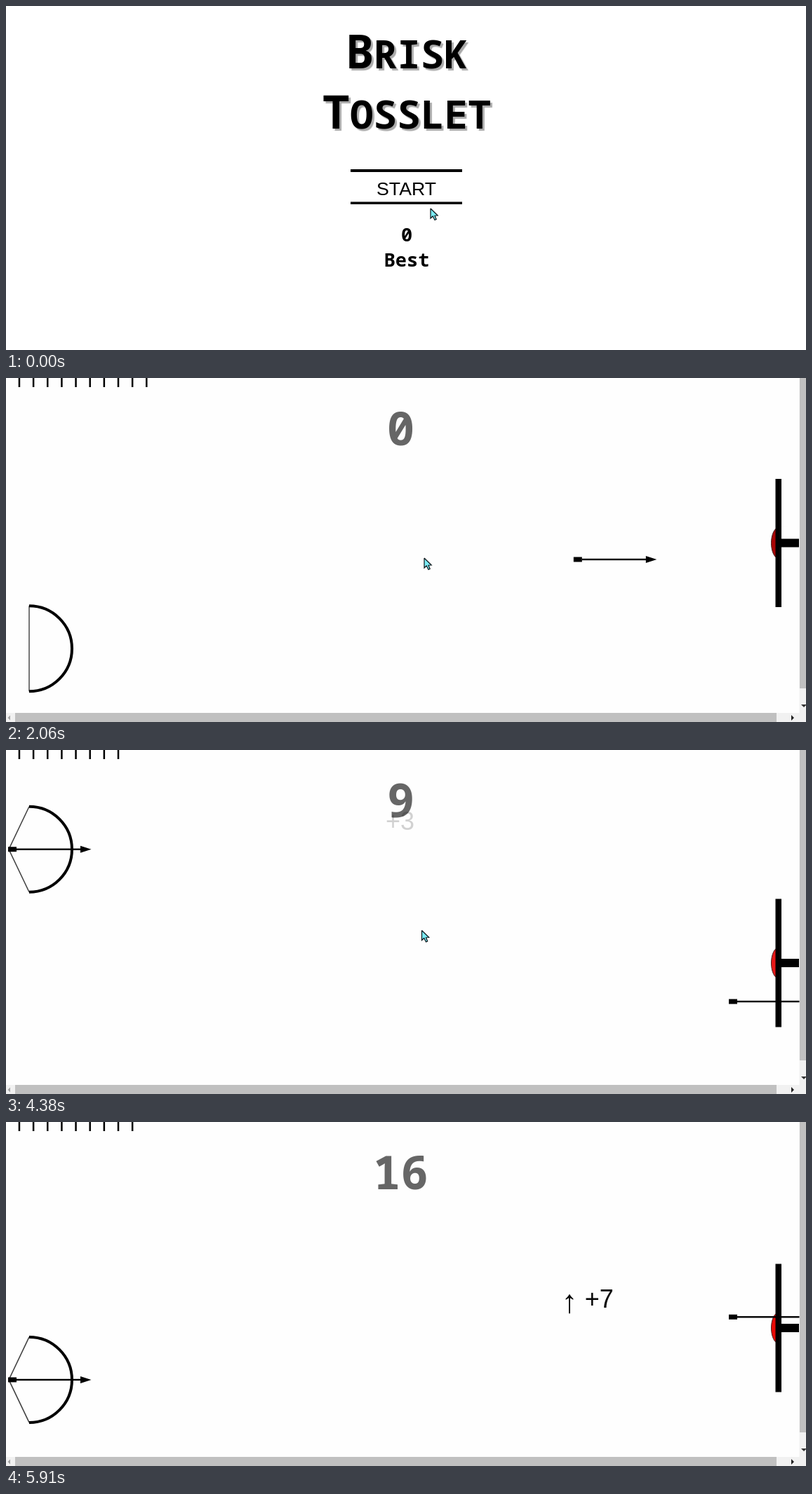
Animation of 1140 by 491 pixels, one loop 5970 ms. Source, as an HTML page with a canvas:

```html
<!DOCTYPE html>
<html lang="en">
<head>
<meta charset="utf-8">
<title>Brisk Tosslet</title>
<style>
  html, body { margin: 0; width: 100%; height: 100%; overflow: hidden; background: #fff; }
  canvas { display: block; width: 1140px; height: 491px; }
</style>
</head>
<body>
<canvas id="stage" width="1140" height="491"></canvas>
<script>
const ctx = document.getElementById('stage').getContext('2d');
const LOOP = 5970, GAME_START = 880, CURSOR_END = 5840;
const MONO = '"Noto Sans Mono", "DejaVu Sans Mono", monospace';
const SANS = '"Liberation Sans", Arial, sans-serif';

const REST_X = 3, HIT_X = 1030, ARROW_SPEED = 1.495;
const FLIGHT = (HIT_X - REST_X) / ARROW_SPEED;

// Target state before the first hit; each shot describes the state after it lands.
const OPENING = { score: '0', ticks: 10, target: 235.5, red: '#a80404' };
const SHOTS = [
  { fire: 1521, y: 259, stuckY: 279, label: '+6', rise: 2208,
    score: '6', ticks: 9, target: 255, red: '#f60400' },
  { fire: 2809, y: 310, stuckY: 359, label: '+3', rise: 3490,
    score: '9', ticks: 8, target: 304, red: '#e81818' },
  { fire: 5005, y: 288, stuckY: 278.3, label: '+7', bonus: true, rise: 5770,
    score: '16', ticks: 9, target: 294, red: '#e80a06' }
];

const CURSOR = [
  [0, 605, 289], [120, 603, 287], [660, 578, 262], [730, 589, 249], [880, 590, 259],
  [1020, 590, 259], [2060, 596, 257], [2890, 596, 257], [3760, 593, 257],
  [5000, 592, 258], [CURSOR_END, 592, 259]
];

function snap(t) {
  if (t < 120) return 0;
  const [start, step, last] = t < 3270 ? [120, 69.26, 43] : [3270, 69.35, 38];
  const n = Math.min(last, Math.floor((t - start + 4.99) / step));
  return Math.round((start + Math.max(0, n) * step) / 10) * 10;
}

// cubic-bezier(.42, 0, 1, 1)
function easeIn(x) {
  let lo = 0, hi = 1;
  for (let i = 0; i < 24; i++) {
    const u = (lo + hi) / 2, v = 1 - u;
    if (1.26 * v * v * u + 3 * v * u * u + u * u * u < x) lo = u; else hi = u;
  }
  return 3 * (1 - lo) * lo * lo + lo * lo * lo;
}

function along(keys, t) {
  for (let i = 1; i < keys.length; i++) {
    const [t0, x0, y0] = keys[i - 1], [t1, x1, y1] = keys[i];
    if (t <= t1) {
      const k = (t - t0) / (t1 - t0);
      return [x0 + (x1 - x0) * k, y0 + (y1 - y0) * k];
    }
  }
  return keys[keys.length - 1].slice(1);
}

// Bow bounces at constant speed between top and bottom.
function bowY(t) {
  const top = 39.7, range = 395, half = 1680;
  const phase = ((t - 3946) / half % 2 + 2) % 2;
  return top + range * (phase < 1 ? phase : 2 - phase);
}

function rect(color, x, y, w, h) {
  ctx.fillStyle = color;
  ctx.fillRect(x, y, w, h);
}

function poly(points, color) {
  ctx.beginPath();
  points.forEach(([x, y]) => ctx.lineTo(x, y));
  ctx.closePath();
  ctx.fillStyle = color;
  ctx.fill();
}

function line(points, width, color) {
  ctx.beginPath();
  points.forEach(([x, y]) => ctx.lineTo(x, y));
  ctx.lineWidth = width;
  ctx.strokeStyle = color;
  ctx.stroke();
}

function text(str, x, y, font, color, align = 'center') {
  ctx.font = font;
  ctx.fillStyle = color;
  ctx.textAlign = align;
  ctx.fillText(str, x, y);
}

function smallCaps(word, cx, y) {
  const big = `bold 66px ${MONO}`, small = `bold 56px ${MONO}`;
  const head = word[0], tail = word.slice(1).toUpperCase();
  ctx.font = big;
  const headW = ctx.measureText(head).width;
  ctx.font = small;
  const x = cx - (headW + ctx.measureText(tail).width) / 2;
  text(head, x, y, big, '#000', 'left');
  text(tail, x + headW, y, small, '#000', 'left');
}

function drawMenu() {
  ctx.save();
  ctx.shadowColor = '#aaa';
  ctx.shadowOffsetX = ctx.shadowOffsetY = 3;
  ctx.shadowBlur = 1;
  smallCaps('Brisk', 571, 88.5);
  smallCaps('Tosslet', 571, 174.5);
  ctx.restore();
  rect('#000', 491, 233, 159, 4);
  rect('#000', 491, 279.5, 159, 3.5);
  text('START', 570.5, 270, `26.67px ${SANS}`, '#000');
  text('0', 571, 336, `bold 27px ${MONO}`, '#000');
  text('Best', 571, 372, `bold 27px ${MONO}`, '#000');
}

function drawArrow(x, y) {
  rect('#000', x, y - 3.5, 12, 7);
  rect('#000', x + 12, y - 1.2, 94, 2.4);
  poly([[x + 103, y - 5], [x + 118.5, y], [x + 103, y + 5]], '#000');
}

function drawBow(y, loaded) {
  if (loaded) line([[33, y - 61], [4, y], [33, y + 61]], 1.6, '#444');
  else line([[33, y - 61], [33, y + 61]], 2, '#777');
  ctx.beginPath();
  ctx.arc(33, y, 61, -Math.PI / 2, Math.PI / 2);
  ctx.lineWidth = 4;
  ctx.strokeStyle = '#000';
  ctx.stroke();
  if (loaded) drawArrow(REST_X, y);
}

function drawTarget(y, red) {
  ctx.beginPath();
  ctx.ellipse(1101, y, 10.5, 22, 0, 0, Math.PI * 2);
  ctx.fillStyle = red;
  ctx.fill();
  ctx.lineWidth = 1;
  ctx.strokeStyle = '#422';
  ctx.stroke();
  rect('#fefefe', 1105, y - 24, 10, 48);
  rect('#000', 1096.5, y - 91.5, 8.5, 183);
  rect('#000', 1104, y - 6, 26, 12);
}

function drawScrollbars() {
  rect('#f1f1f1', 1130.5, 0, 9.5, 491);
  rect('#f1f1f1', 0, 478, 1140, 13);
  rect('#c0c0c0', 1131, 0, 9, 443);
  rect('#c0c0c0', 13, 478, 1085, 13);
  poly([[1133, 466], [1141, 466], [1137, 470]], '#333');
  poly([[1119, 481], [1123, 485], [1119, 489]], '#222');
  poly([[6, 481.5], [2.5, 485], [6, 488.5]], '#a3a3a3');
}

// Points gained drift towards the score and fade; a bonus adds an up arrow.
function drawLabel(shot, t) {
  const k = (t - shot.rise) / 1000;
  if (k >= 1) return;
  const p = easeIn(Math.max(0, k));
  const x = 804 - 319 * p, y = 271.5 - 191 * p;
  ctx.globalAlpha = 1 - p;
  if (shot.bonus) text('↑', x + 9, y + 7, `46px ${SANS}`, '#000');
  text(shot.label, x + (shot.bonus ? 31 : 0), y, `36px ${SANS}`, '#000', 'left');
  ctx.globalAlpha = 1;
}

function drawGame(t) {
  const shot = SHOTS.filter(s => t >= s.fire).pop();
  const landed = SHOTS.filter(s => t >= s.fire + FLIGHT);
  const state = landed[landed.length - 1] || OPENING;
  const flying = shot && shot !== state;

  for (let i = 0; i < state.ticks; i++) rect('#000', 17.7 + 20.15 * i, 0, 2.5, 13);
  text(state.score, 562.5, 96, `bold 66px ${MONO}`, '#666');
  drawTarget(state.target, state.red);
  drawBow(bowY(t), !flying);
  if (flying) drawArrow(REST_X + (t - shot.fire) * ARROW_SPEED, shot.y);
  else if (shot) drawArrow(HIT_X, shot.stuckY);
  landed.forEach(s => drawLabel(s, t));
  drawScrollbars();
}

function drawCursor(t) {
  const [x, y] = along(CURSOR, t);
  const shape = [[0, 0], [0, 14], [3.2, 11], [6, 16.5], [8.2, 15.4], [6, 10.2], [10.2, 10]]
    .map(([dx, dy]) => [x + dx, y + dy]);
  poly(shape, '#7cebf4');
  line([...shape, shape[0]], 1.2, '#0a1418');
}

function draw(now) {
  const t = snap(now % LOOP);
  const playing = t >= GAME_START;
  rect(playing ? '#fefefe' : '#fff', 0, 0, 1140, 491);
  if (playing) drawGame(t); else drawMenu();
  if (t < CURSOR_END) drawCursor(t);
}

const begin = performance.now();
function tick() {
  draw(performance.now() - begin);
  requestAnimationFrame(tick);
}
tick();
</script>
</body>
</html>
```
